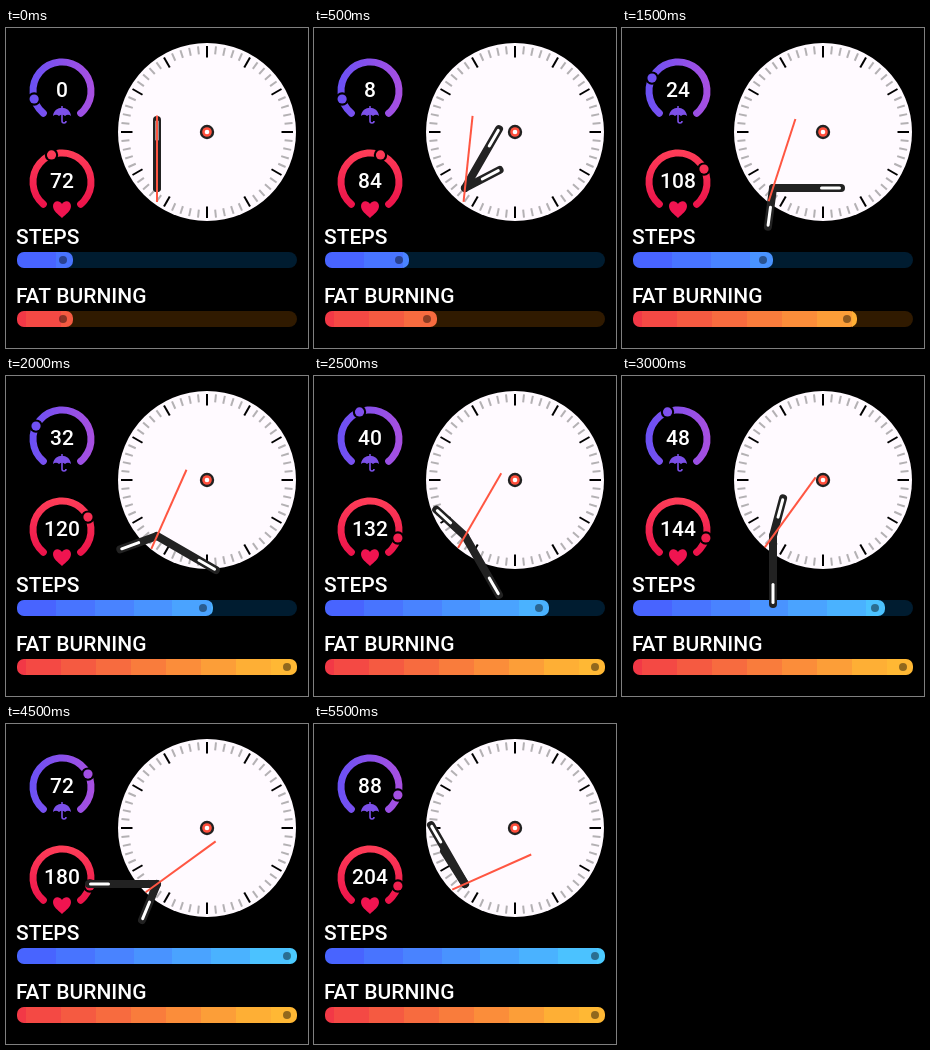
Animation, 302 px wide and 320 px high, one loop 6000 ms. Source, as an HTML page with a canvas:

```html
<!DOCTYPE html>
<html lang="en">
<head>
<meta charset="utf-8">
<title>Watch face</title>
<style>
  html, body { margin: 0; width: 100%; height: 100%; overflow: hidden; background: #000; }
  canvas { display: block; width: 302px; height: 320px; }
</style>
</head>
<body>
<canvas id="face" width="302" height="320"></canvas>
<script>
const ctx = document.getElementById('face').getContext('2d');
const STEP = 500, STEPS = 12, TAU = Math.PI * 2;
const rad = deg => deg * Math.PI / 180;

function disc(x, y, r, color) {
  ctx.fillStyle = color;
  ctx.beginPath();
  ctx.arc(x, y, r, 0, TAU);
  ctx.fill();
}

function line(x1, y1, x2, y2, width, color, cap = 'butt') {
  ctx.strokeStyle = color;
  ctx.lineWidth = width;
  ctx.lineCap = cap;
  ctx.beginPath();
  ctx.moveTo(x1, y1);
  ctx.lineTo(x2, y2);
  ctx.stroke();
}

function text(str, x, y, align) {
  ctx.font = '500 21px Roboto, sans-serif';
  ctx.textAlign = align;
  ctx.fillStyle = '#fff';
  ctx.fillText(str, x, y);
}

function rotated(x, y, deg, draw) {
  ctx.save();
  ctx.translate(x, y);
  ctx.rotate(rad(deg));
  draw();
  ctx.restore();
}

function gradient(x1, y1, x2, y2, from, to) {
  const g = ctx.createLinearGradient(x1, y1, x2, y2);
  g.addColorStop(0, from);
  g.addColorStop(1, to);
  return g;
}

function umbrella(x, y, color) {
  ctx.fillStyle = color;
  ctx.beginPath();
  ctx.moveTo(x - 9, y + 1);
  ctx.bezierCurveTo(x - 8, y - 10, x + 8, y - 10, x + 9, y + 1);
  ctx.quadraticCurveTo(x + 6, y - 1.5, x + 3, y + 1);
  ctx.quadraticCurveTo(x, y - 1.5, x - 3, y + 1);
  ctx.quadraticCurveTo(x - 6, y - 1.5, x - 9, y + 1);
  ctx.fill();
  line(x, y - 9, x, y - 5, 1.5, color);
  ctx.lineWidth = 1.6;
  ctx.beginPath();
  ctx.moveTo(x, y - 2);
  ctx.lineTo(x, y + 6);
  ctx.arc(x + 2, y + 6, 2, Math.PI, 0, true);
  ctx.stroke();
}

function heart(x, y, color) {
  ctx.fillStyle = color;
  ctx.beginPath();
  ctx.moveTo(x, y + 9);
  ctx.bezierCurveTo(x - 4, y + 5, x - 9, y + 2, x - 9, y - 3);
  ctx.bezierCurveTo(x - 9, y - 8.5, x - 2.5, y - 9.5, x, y - 5);
  ctx.bezierCurveTo(x + 2.5, y - 9.5, x + 9, y - 8.5, x + 9, y - 3);
  ctx.bezierCurveTo(x + 9, y + 2, x + 4, y + 5, x, y + 9);
  ctx.fill();
}

function gauge(y, paint, value, level) {
  const x = 56, r = 29;
  ctx.strokeStyle = paint;
  ctx.lineWidth = 7;
  ctx.lineCap = 'round';
  ctx.beginPath();
  ctx.arc(x, y, r, rad(130), rad(410));
  ctx.stroke();
  const a = rad(-196 + level * 42.4);
  const px = x + r * Math.cos(a), py = y + r * Math.sin(a);
  disc(px, py, 6.7, '#000');
  disc(px, py, 4.6, paint);
  text(value, x, y + 5.5, 'center');
}

function bar(y, track, level, first, band, from, to) {
  const x = 11, w = level * 28, last = Math.ceil((280 - first) / band);
  ctx.fillStyle = track;
  ctx.beginPath();
  ctx.roundRect(x, y, 280, 16, 8);
  ctx.fill();
  ctx.save();
  ctx.beginPath();
  ctx.roundRect(x, y, w, 16, 7);
  ctx.clip();
  for (let i = 0; i <= last; i++) {
    const left = i ? first + (i - 1) * band : 0;
    const rgb = from.map((c, n) => Math.round(c + (to[n] - c) * Math.min(1, i / (last - 0.5))));
    ctx.fillStyle = `rgb(${rgb})`;
    ctx.fillRect(Math.round(x + left), y, band + 1, 16);
  }
  ctx.restore();
  disc(x + w - 10, y + 8, 4, 'rgba(0,0,0,.43)');
}

function dial() {
  disc(201, 104, 89, '#fffaff');
  for (let i = 0; i < 60; i++) {
    const major = i % 5 === 0;
    rotated(201, 104, i * 6, () =>
      line(0, -86, 0, major ? -74.5 : -78, 2, major ? '#000' : '#b4b1b4'));
  }
  disc(201, 104, 7.2, '#222');
  disc(201, 104, 4.8, '#ff4f3c');
  disc(201, 104, 2.3, '#fff');
}

function hand(deg, length) {
  rotated(151, 160, deg, () => {
    line(0, 0, 0, 4 - length, 8, '#222', 'round');
    line(0, 23.5 - length, 0, 5.5 - length, 3, '#fff', 'round');
  });
}

function draw(k) {
  ctx.fillStyle = '#000';
  ctx.fillRect(0, 0, 302, 320);

  const violet = gradient(23, 0, 89, 0, '#6951f5', '#a94fe0');
  const red = gradient(0, 121, 0, 187, '#ff3e58', '#e90c48');
  gauge(63, violet, 8 * k, Math.max(0, Math.floor((k - 1) / 2)));
  umbrella(56, 87, '#7c50e8');
  const pulse = 72 + 12 * k;
  gauge(154, red, pulse, Math.min(5, Math.floor(pulse / 26)));
  heart(56, 181, '#f01450');

  text('STEPS', 10, 216, 'left');
  bar(224, '#001c30', Math.min(10, Math.floor(2 + 1.25 * k)), 39, 38.8, [72, 100, 255], [75, 202, 255]);
  text('FAT BURNING', 10, 275, 'left');
  bar(283, '#301a00', Math.min(10, 2 + 2 * k), 9, 35, [242, 56, 70], [255, 184, 52]);

  dial();
  hand(62.5 * k, 43);
  hand(30 * k, 72);
  rotated(151, 160, 6 * k, () => line(0, 14, 0, -72.5, 2, '#ff5642'));
}

function tick() {
  draw(Math.floor(performance.now() / STEP) % STEPS);
  requestAnimationFrame(tick);
}
tick();
</script>
</body>
</html>
```
